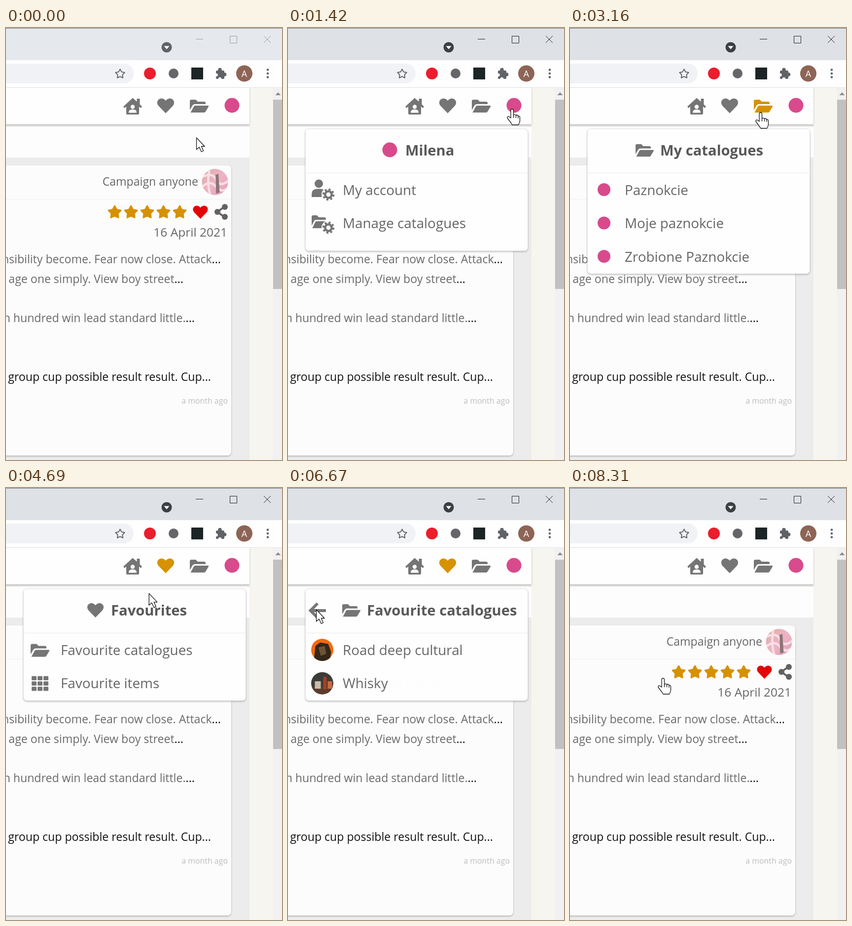
Animation, 560 px wide and 874 px high, one loop 9.1 s. Source, as an HTML page:

```html
<!DOCTYPE html>
<html lang="en">
<head>
<meta charset="utf-8">
<title>Dropdown menu</title>
<style>
  html, body { margin: 0; width: 100%; height: 100%; overflow: hidden; }
  #stage { display: block; width: 100vw; height: 100vh; background: #f7f5f0;
    --bar: #dee1e6; --control: #222; --caret: #3c4043; }
  #stage.idle { --bar: #e5e9ee; --control: #a09a98; --caret: #5f6368; }
  text { font: 23.1px "Open Sans", "Noto Sans", sans-serif; fill: currentColor; }
  .end { text-anchor: end; }
  .icon { color: #757575; fill: currentColor; }
  .item { color: #666; }
  .item text { font-size: 27.8px; }
  .title { color: #585858; }
  .title text { font-size: 29.2px; font-weight: 700; }
  .on, .on .icon { color: #d69200; }
  .line { fill: none; stroke: currentColor; }
</style>
</head>
<body>
<svg id="stage" viewBox="0 0 560 874" preserveAspectRatio="none">
  <defs>
    <path id="heart" d="M17 30L2.5 15C-1 11-1 5 3 2C7-1.5 13-.5 17 4.5C21-.5 27-1.5 31 2C35 5 35 11 31.5 15Z"/>
    <path id="folder" d="M0 21V3Q0 0 3 0H12L16 4H29Q32 4 32 7V9H10Q7 9 5.5 11.5ZM1.5 26L8 14Q9 12 11 12H36.5Q39 12 38 14L32 24Q31 26 29 26H1.5Z"/>
    <path id="star" d="M0-13L4.1-5.6L12.4-4L6.6 2.1L7.6 10.5L0 6.9L-7.6 10.5L-6.6 2.1L-12.4-4L-4.1-5.6Z" stroke-linejoin="round"/>
    <g id="cog">
      <circle r="14" fill="#fefefe"/>
      <circle r="10" class="line" stroke-width="4.5" stroke-dasharray="3.927"/>
      <circle r="6.7" class="line" stroke-width="4.6"/>
    </g>
    <linearGradient id="skin" x2="1" y2="1">
      <stop stop-color="#d9b0a0"/><stop offset=".5" stop-color="#efb3c6"/><stop offset="1" stop-color="#dca0b4"/>
    </linearGradient>
    <clipPath id="round"><circle r="22.5"/></clipPath>
    <filter id="shadow" x="-10%" y="-10%" width="120%" height="125%">
      <feDropShadow dx="0" dy="1.5" stdDeviation="1.6" flood-color="#444" flood-opacity=".4"/>
    </filter>
  </defs>

  <!-- browser chrome -->
  <rect width="560" height="66" fill="var(--bar)"/>
  <path d="M0 .5H560" stroke="#777"/>
  <circle cx="326" cy="39" r="10.5" fill="var(--caret)"/>
  <path d="M320.5 36.5H331.5L326 43Z" fill="#fff"/>
  <path d="M385 22.5H400M454.5 16.5H468.5V30.5H454.5ZM523 16L537 30M537 16L523 30" fill="none" stroke="var(--control)"/>
  <rect y="65" width="560" height="55" fill="#fefefe"/>
  <rect x="-40" y="72" width="299" height="40" rx="20" fill="#f1f2f5"/>
  <use href="#star" transform="translate(231.5 93) scale(.74)" fill="none" stroke="#5f6368" stroke-width="2.6"/>
  <circle cx="292" cy="92" r="12" fill="#ec1d2c"/>
  <circle cx="340" cy="92" r="10" fill="#66666a"/>
  <rect x="376" y="80" width="24" height="24" fill="#1c2426"/>
  <g fill="#5f6368">
    <rect x="426" y="86" width="17" height="17" rx="2"/>
    <circle cx="434" cy="84.5" r="3.8"/><circle cx="443.5" cy="94" r="3.8"/>
    <circle cx="531" cy="84.5" r="2.3"/><circle cx="531" cy="92" r="2.3"/><circle cx="531" cy="99.5" r="2.3"/>
  </g>
  <g fill="#fefefe"><circle cx="426.5" cy="95" r="3.3"/><circle cx="434" cy="103" r="3.3"/></g>
  <circle cx="483.5" cy="92" r="16.5" fill="#8d6455"/>
  <text x="483.5" y="98.5" text-anchor="middle" color="#fff" style="font-size:18px">A</text>

  <!-- page -->
  <path d="M0 120.5H560" stroke="#e4e4e6"/>
  <rect y="196" width="494" height="678" fill="#ececec"/>
  <rect y="200" width="494" height="62" fill="#fdfdfd"/>
  <rect x="-20" y="121" width="514" height="74" fill="#fefefe" filter="url(#shadow)"/>
  <rect x="541" y="121" width="19" height="753" fill="#f1f1f1"/>
  <rect x="542" y="145" width="18" height="383" fill="#c1c1c1"/>
  <path d="M546.5 136H557.5L552 130Z" fill="#8c8c8c"/>
  <rect x="-20" y="278" width="477" height="587" rx="8" fill="#fcfcfd" filter="url(#shadow)"/>
  <path d="M0 346.5H457" stroke="#eeeeea"/>
  <g color="#666">
    <text class="end" x="390" y="319">Campaign anyone</text>
    <text class="end" x="449" y="422" style="font-size:24.5px">16 April 2021</text>
  </g>
  <g transform="translate(424 311.5) scale(1.18)" clip-path="url(#round)">
    <rect x="-23" y="-23" width="46" height="46" fill="url(#skin)"/>
    <path d="M-23-8Q-4-18 2-4T23-2M-22 8Q-8-4 2 8T22 10M-10-20Q-14 4-8 22" fill="none" stroke="#f8dfe6" stroke-width="4"/>
    <path d="M1-12L6-14L8 18L2 20Z" fill="#8b7478"/>
  </g>
  <g id="rating" fill="#d69100" stroke="#d69100" stroke-width="3"></g>
  <use href="#heart" transform="translate(379.5 359.5) scale(.88)" fill="#e30505"/>
  <g color="#626262" fill="currentColor">
    <path class="line" d="M444 361L429 372L444 383" stroke-width="4"/>
    <circle cx="444" cy="362" r="6"/><circle cx="429" cy="372" r="6"/><circle cx="444" cy="382" r="6"/>
  </g>
  <g class="end" color="#6a6a6a">
    <text x="436" y="476">Responsibility become. Fear now close. Attack<tspan fill="#111">...</tspan></text>
    <text x="360" y="516">age one simply. View boy street<tspan fill="#111">...</tspan></text>
    <text x="383" y="595">with hundred win lead standard little.<tspan fill="#111">...</tspan></text>
    <text x="416" y="714" color="#111">group cup possible result result. Cup...</text>
    <text x="450" y="760" color="#bdbdbd" style="font-size:15.9px">a month ago</text>
  </g>

  <!-- navigation -->
  <g class="icon">
    <path d="M238 159L257 141.5L265.5 149V143H271.5V154.5L276 159L273.5 162L270 159V173Q270 175 268 175H246Q244 175 244 173V159L240.5 162Z"/>
    <path d="M249 171.5C249 166 252 165 257 165S265 166 265 171.5Z" fill="#fefefe"/>
    <circle cx="257" cy="159.5" r="4.2" fill="#fefefe"/>
  </g>
  <use id="navHeart" class="icon" href="#heart" x="307" y="142.5"/>
  <use id="navFolder" class="icon" href="#folder" x="373" y="145"/>
  <circle cx="458.5" cy="156.5" r="15" fill="#d84a8c"/>

  <!-- dropdown -->
  <g id="menu">
    <rect id="panel" x="35.5" y="204" width="451" rx="7" fill="#fefefe" stroke="#e4e4ee" filter="url(#shadow)"/>
    <svg id="content" width="560">
      <path d="M36 293.5H486" stroke="#e9e9ec"/>
      <g id="pages"></g>
    </svg>
  </g>

  <g id="cursor" fill="#fefefe" stroke="#151515" stroke-width="1.3" stroke-linejoin="round">
    <path id="arrow" d="M.5 0V24L6 19L10.5 28.5L14.5 26.5L10.5 17.5H17Z"/>
    <g id="hand">
      <path d="M-3 18V3Q-3 0-.2 0T2.500 3V12Q5 10 7.500 12.500Q10 11 12 14Q15 13 15.500 17V24Q15 28 12.500 32H0Q-3 27-6 23.500L-10 18Q-10 14-7 15Z"/>
      <path d="M2.5 12V18M7.5 12.5V18M12 14V19" fill="none"/>
    </g>
  </g>
</svg>
<script>
const LOOP = 9100, OPEN = 1180, CLOSE = 8070, TOP = 204, TALL = 497, SHORT = 430, DIVIDER = 293, ROW = 67.5;
const $ = id => document.getElementById(id);
const place = (id, x, y, scale = 1) => `<use class="icon" href="#${id}" transform="translate(${x} ${y}) scale(${scale})"/>`;
const badge = (x, y, r) => `<circle cx="${x}" cy="${y}" r="${r}" fill="#d84a8c"/>`;
const photo = (row, shapes) =>
  `<g transform="translate(69.5 ${327.5 + row * ROW})"><g clip-path="url(#round)">${shapes}</g></g>`;
const title = (x, label, icon) => `<g class="title">${icon}<text x="${x}" y="258">${label}</text></g>`;
const item = ([label, icon], row) =>
  `<g class="item">${icon}<text x="111" y="${337.5 + row * ROW}">${label}</text></g>`;

const userCog = `<g class="icon"><circle cx="62.5" cy="315" r="8.5"/>
  <path d="M48 342V337Q48 326 58 325.5H67Q77 326 77 337V342Z"/><use href="#cog" x="82" y="337"/></g>`;
const folderCog = `<g class="icon"><use href="#folder" transform="translate(48 379) scale(.9 1)"/><use href="#cog" x="82" y="404"/></g>`;
const logOut = `<g class="icon"><path class="line" stroke-width="4.5" d="M63 452H54V474H63M62 463H85M76 454L85 463L76 472"/></g>`;
const cells = [...Array(9).keys()].map(i =>
  `<rect x="${52 + i % 3 * 12}" y="${380.5 + (i / 3 | 0) * 10.8}" width="10" height="8.5" rx="1.5"/>`).join('');
const backArrow = `<path id="back" class="icon line" style="fill:none" stroke-width="5.8" d="M77 248H47M60 233.5L45.5 248L60 262.5"/>`;
const bull = `<rect x="-23" y="-23" width="46" height="46" fill="#f4680c"/>
  <path d="M-17 23L-14-8L-4-15L12-12L18 4L15 23Z" fill="#302517"/><path d="M-8-5L5-8L8 8L-3 12Z" fill="#6a5230"/>`;
const bottles = `<rect x="-23" y="-23" width="46" height="46" fill="#3b3a36"/>
  <rect x="-23" y="7" width="46" height="16" fill="#5b3a2b"/><rect x="-15" y="-4" width="12" height="15" fill="#c9bda8"/>
  <rect x="2" y="-13" width="7" height="25" fill="#a43f20"/><rect x="11" y="-4" width="9" height="15" fill="#c86a3c"/>`;

const pages = {
  profile: {
    head: title(238, 'Milena', badge(206.5, 246.5, 15)),
    items: [['My account', userCog], ['Manage catalogues', folderCog], ['Log out', logOut]]
  },
  catalogues: {
    nav: 'navFolder',
    head: title(183, 'My catalogues', place('folder', 133, 235, .97)),
    items: ['Paznokcie', 'Moje paznokcie', 'Zrobione Paznokcie'].map((name, i) => [name, badge(69, 327 + i * ROW, 13)])
  },
  favourites: {
    nav: 'navHeart',
    head: title(213, 'Favourites', place('heart', 165, 233, .97)),
    items: [['Favourite catalogues', place('folder', 50, 315.5)], ['Favourite items', `<g class="icon">${cells}</g>`]]
  },
  saved: {
    nav: 'navHeart',
    head: title(160, 'Favourite catalogues', backArrow + place('folder', 110, 235, .97)),
    items: [['Road deep cultural', photo(0, bull)], ['Whisky', photo(1, bottles)]]
  }
};
for (const [name, page] of Object.entries(pages))
  $('pages').innerHTML += `<g id="${name}">${page.head}${page.items.map(item).join('')}</g>`;
for (let i = 0; i < 5; i++) $('rating').innerHTML += `<use href="#star" x="${220.5 + i * 33}" y="373"/>`;

// start, page, cross-fade length
const visits = [[OPEN, 'profile', 1], [2510, 'catalogues', 360], [3730, 'favourites', 70],
  [5360, 'saved', 160], [6670, 'favourites', 110]];

// time, x, y of the pointer tip
const path = [[0, 386, 222], [20, 386, 222], [180, 350, 190], [340, 372, 125], [500, 460, 117], [650, 521, 150],
  [760, 495, 190], [870, 455, 164], [1960, 455, 164], [2180, 387, 171], [3160, 387, 171], [3510, 322, 162],
  [4600, 322, 162], [4690, 290, 213], [5160, 181, 325], [5360, 181, 325], [5710, 128, 321], [5920, 130, 388],
  [6270, 57, 246], [7110, 57, 246], [7400, 181, 324], [7730, 189, 385], [LOOP, 189, 385]];

const clamp = v => Math.min(1, Math.max(0, v));
const easeOut = v => 1 - (1 - clamp(v)) ** 2;

// Monotone cubic interpolation: smooth through waypoints, still at pauses.
function slope(i, axis) {
  const secant = j => path[j + 1] && path[j] ? (path[j + 1][axis] - path[j][axis]) / (path[j + 1][0] - path[j][0]) : 0;
  const a = secant(i - 1), b = secant(i);
  return a * b > 0 ? 2 * a * b / (a + b) : 0;
}
function pointer(t, axis) {
  const i = path.findIndex((p, n) => n === path.length - 2 || t < path[n + 1][0]);
  const [p, q] = [path[i], path[i + 1]], span = q[0] - p[0], u = (t - p[0]) / span, w = 1 - u;
  return p[axis] * (1 + 2 * u) * w * w + q[axis] * (3 - 2 * u) * u * u
    + span * u * w * (slope(i, axis) * w - slope(i + 1, axis) * u);
}

function menuBottom(t) {
  if (t < 3730) return TOP + (TALL - TOP) * easeOut((t - OPEN) / 400);
  if (t < CLOSE) return TALL + (SHORT - TALL) * easeOut((t - 3730) / 70);
  return SHORT + (TOP - SHORT) * easeOut((t - CLOSE) / 240);
}

function draw(t) {
  const x = pointer(t, 1), y = pointer(t, 2), bottom = menuBottom(t);
  const open = t >= OPEN && t < CLOSE, shown = bottom > TOP + 1;
  const at = visits.findLastIndex(v => t >= v[0]);
  const [start, name, fade] = visits[at] || [0, '', 1];
  const mix = clamp((t - start) / fade);

  $('stage').classList.toggle('idle', t < OPEN);
  $('menu').style.display = shown ? '' : 'none';
  $('panel').setAttribute('height', Math.max(0, bottom - TOP));
  $('content').setAttribute('height', Math.max(0, bottom - 1));

  const over = (cx, cy, rx, ry) => Math.abs(x - cx) < rx && Math.abs(y - cy) < ry;
  const onHeart = over(324, 158, 20, 20), onFolder = over(392, 158, 20, 20), onProfile = over(458, 158, 20, 20);
  const onBack = name === 'saved' && over(60, 248, 24, 24);
  const row = open && y > DIVIDER && y < bottom && x > 35 && x < 487 ? Math.floor((y - DIVIDER) / ROW) : -1;
  const active = open && pages[name].nav;

  $('navHeart').classList.toggle('on', onHeart || active === 'navHeart');
  $('navFolder').classList.toggle('on', onFolder || active === 'navFolder');
  $('back').classList.toggle('on', onBack);

  for (const id in pages) {
    const opacity = id === name ? mix : at > 0 && id === visits[at - 1][1] ? 1 - mix : 0;
    const group = $(id);
    group.style.opacity = opacity;
    group.style.display = opacity ? '' : 'none';
    group.querySelectorAll('.item').forEach((el, i) => el.classList.toggle('on', id === name && i === row));
  }

  const pointing = onHeart || onFolder || onProfile || onBack || row >= 0 || t >= CLOSE;
  $('hand').style.display = pointing ? '' : 'none';
  $('arrow').style.display = pointing ? 'none' : '';
  $('cursor').setAttribute('transform', `translate(${x} ${y})`);
}

const begin = performance.now();
function tick() {
  draw((performance.now() - begin) % LOOP);
  requestAnimationFrame(tick);
}
tick();
</script>
</body>
</html>
```
